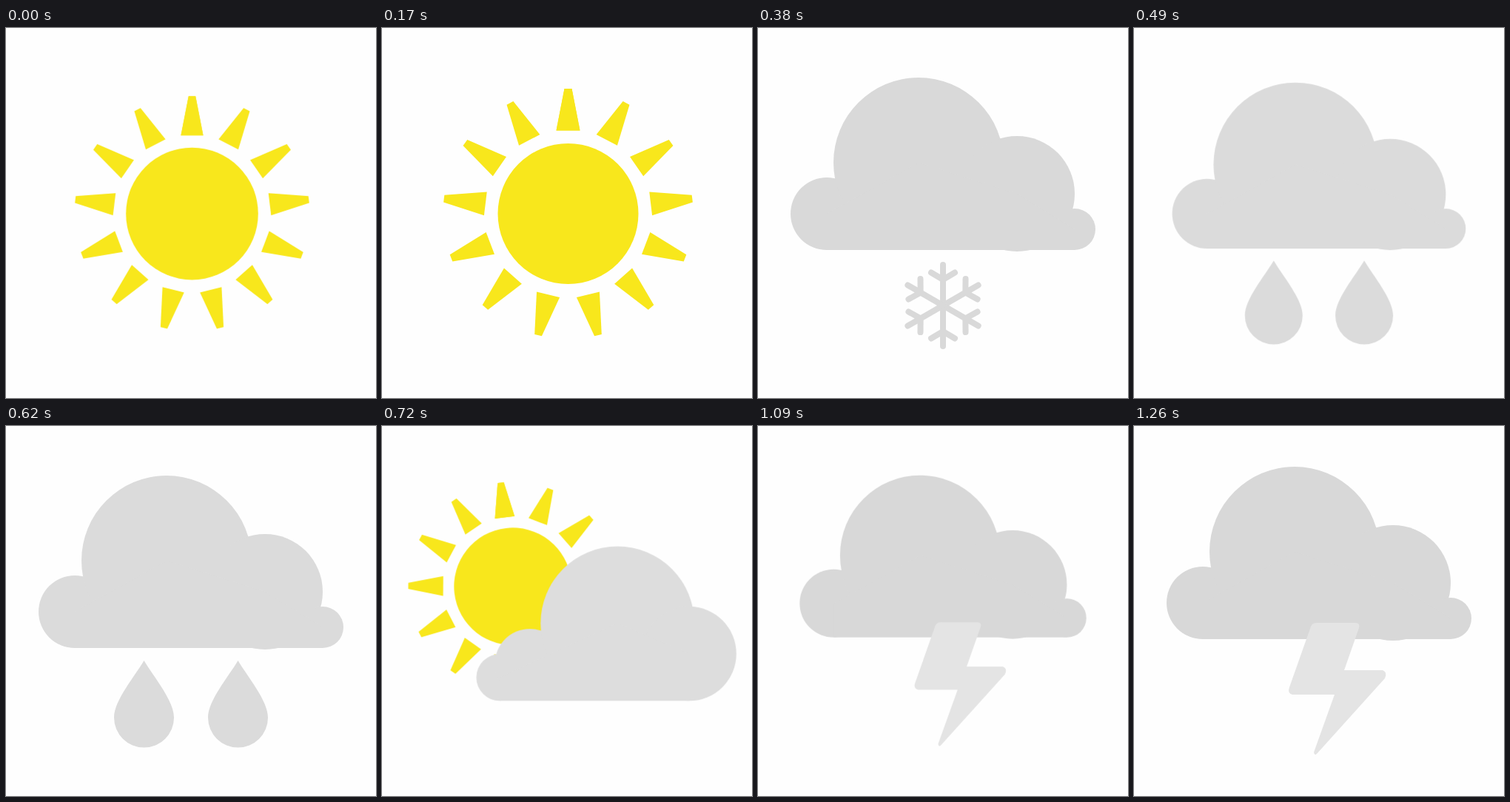
An HTML page that plays this animation: 500x500 px, repeating every 1300 ms.

```html
<!DOCTYPE html>
<html lang="en">
<head>
<meta charset="utf-8">
<title>Weather icons</title>
<style>
  html, body { margin: 0; width: 100%; height: 100%; overflow: hidden; background: #fefefe; }
  svg { display: block; width: 100vw; height: 100vh; }

  /* Each card covers the one before it and settles to full size. */
  .card {
    transform-origin: 250px 250px;
    animation: pop 1300ms infinite;
    animation-delay: calc(var(--start) * 1ms - 1300ms);
  }
  .back { fill: #fefefe; }
  .sun { fill: #f8e71c; }

  @keyframes pop {
    0% { visibility: visible; transform: scale(.94); animation-timing-function: cubic-bezier(.4, .4, .7, 1); }
    12% { visibility: visible; transform: scale(1); }
    17.685% { visibility: visible; transform: scale(1); }
    17.69%, 100% { visibility: hidden; transform: scale(1); }
  }
</style>
</head>
<body>
<svg viewBox="0 0 500 500">
  <defs>
    <rect id="back" class="back" x="-50" y="-50" width="600" height="600"/>
    <g id="cloud">
      <circle cx="93" cy="251" r="49"/>
      <circle cx="217" cy="182" r="115"/>
      <circle cx="350" cy="224" r="78"/>
      <circle cx="428" cy="272" r="28"/>
      <path d="M93 300V251L217 182L350 224L428 272V300Z"/>
    </g>
    <g id="sun" class="sun">
      <circle r="95"/>
      <g id="rays"><path id="ray" d="M-16-112.5L-5-169H5L16-112.5Z"/></g>
    </g>
    <path id="arm" d="M0 0V-55M-16-44.5L0-35L16-44.5"/>
    <path id="drop" d="M0 0C13 22 40.5 54 40.5 77A40.5 40.5 0 0 1-40.5 77C-40.5 54-13 22 0 0Z"/>
  </defs>

  <g class="card" style="--start:1090" fill="#d8d8d8">
    <use href="#back"/>
    <use href="#cloud" y="-12"/>
    <path fill="#e4e4e4" d="M247 266H299Q306 266 304 273L284 330H336Q343 333 339 341L247 443Q244 446 243 441L271 363H214Q207 361 210 353L239 271Q241 266 247 266Z"/>
  </g>

  <g class="card" style="--start:0">
    <use href="#back"/>
    <use href="#sun" x="251.5" y="251"/>
  </g>

  <g class="card" style="--start:220" fill="#d9d9d9">
    <use href="#back"/>
    <use href="#cloud"/>
    <g id="flake" transform="translate(250 375)" fill="none" stroke="#d9d9d9" stroke-width="8" stroke-linecap="round" stroke-linejoin="round"></g>
  </g>

  <g class="card" style="--start:440" fill="#dbdbdb">
    <use href="#back"/>
    <use href="#cloud"/>
    <use href="#drop" x="186.5" y="317"/>
    <use href="#drop" x="313.5" y="317"/>
  </g>

  <g class="card" style="--start:650" fill="#ddd">
    <use href="#back"/>
    <g transform="translate(250 250) scale(1.032) translate(-250 -250)">
      <use href="#sun" transform="translate(177 217) rotate(-6.6) scale(.832)"/>
      <circle cx="159.5" cy="339.5" r="31.5"/>
      <circle cx="200" cy="321" r="47"/>
      <circle cx="318" cy="266.5" r="103.5"/>
      <circle cx="414.5" cy="307.5" r="63.5"/>
      <path d="M159.5 371V339.5L200 321L318 266.5L414.5 307.5V371Z"/>
    </g>
  </g>
</svg>
<script>
  // Repeats one shape evenly around the centre of its parent.
  function repeatAround(parentId, shapeId, count) {
    const parent = document.getElementById(parentId);
    const shape = document.getElementById(shapeId);
    for (let i = 0; i < count; i++) {
      const copy = shape.cloneNode();
      copy.removeAttribute('id');
      copy.setAttribute('transform', `rotate(${i * 360 / count})`);
      parent.append(copy);
    }
  }
  repeatAround('rays', 'ray', 13);
  repeatAround('flake', 'arm', 6);
</script>
</body>
</html>
```
